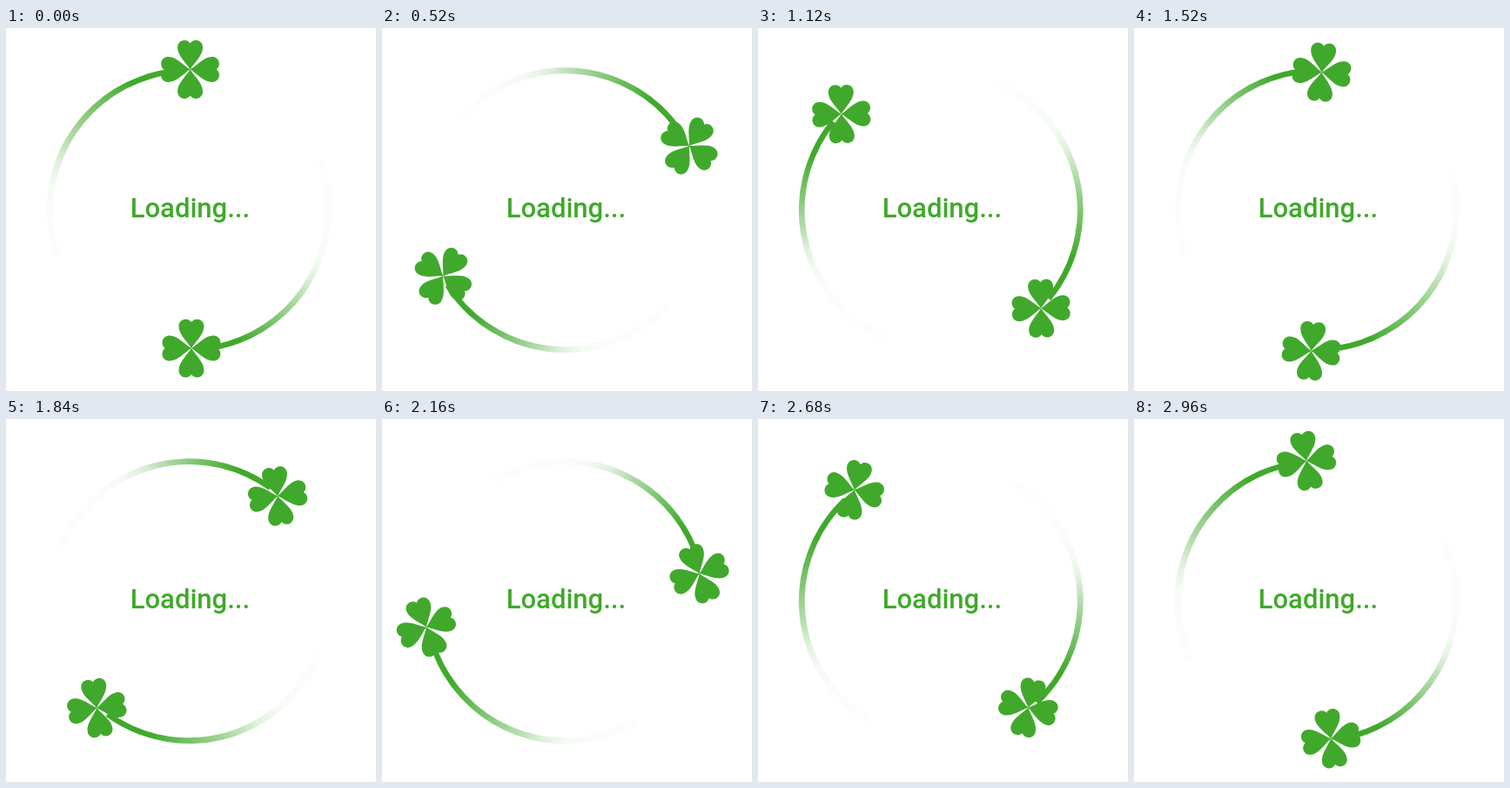
Animation, 425 px wide and 416 px high, one loop 3000 ms. Source, as an HTML page with a canvas:

```html
<!DOCTYPE html>
<html lang="en">
<head>
<meta charset="utf-8">
<title>Loading</title>
<style>
  html, body { margin: 0; width: 100%; height: 100%; overflow: hidden; background: #fff; }
  canvas { display: block; }
  p {
    position: absolute; left: 142.7px; top: 191.6px; margin: 0;
    font: 500 31px/30px Roboto, "Noto Sans", sans-serif;
    color: #40a92b; white-space: nowrap;
  }
</style>
</head>
<body>
<canvas id="stage" width="425" height="416"></canvas>
<p>Loading...</p>
<script>
const ctx = document.getElementById("stage").getContext("2d");
const RAD = Math.PI / 180;
const STEP = 40, STEPS = 75;
const CENTER = [210.2, 208.7], RADIUS = 159.8;
const LAG = 0.25 * RAD; // clovers sit slightly behind the trail's head
const TAIL = 110 * RAD, HEAD = 5 * RAD;
const leaf = new Path2D(
  "M0 0C-5-8-14.5-16-14.5-25C-14.5-34-4-36 0-30C4-36 14.5-34 14.5-25C14.5-16 5-8 0 0Z");

// Trail opacity by degrees behind the clover
const fade = [[110, .015], [95, .02], [80, .05], [70, .16], [60, .38], [45, .65], [24, 1], [0, 1]];

function makeTrail(length) {
  const gradient = ctx.createConicGradient(-Math.PI, 0, 0);
  for (const [deg, alpha] of fade)
    gradient.addColorStop((180 - deg * length) / 360, `rgba(64,169,43,${alpha})`);
  return gradient;
}

const clovers = [
  { side: 1, trail: makeTrail(1) },
  { side: -1, trail: makeTrail(0.87) },
];

// The trail lies between two shifted circles, so it thins towards its head
function drawTrail(angle, trail) {
  ctx.save();
  ctx.translate(...CENTER);
  ctx.rotate(angle);
  ctx.fillStyle = trail;
  ctx.beginPath();
  ctx.arc(-0.6, 0, RADIUS + 4, -TAIL, -HEAD);
  ctx.arc(0.6, 0, RADIUS - 3.6, -HEAD, -TAIL, true);
  ctx.fill();
  ctx.restore();
}

function drawClover(x, y, spin) {
  ctx.save();
  ctx.translate(x, y);
  ctx.rotate(spin);
  ctx.translate(0.75, 0.1);
  ctx.fillStyle = "#40a92b";
  for (let i = 0; i < 4; i++) {
    ctx.fill(leaf);
    ctx.rotate(Math.PI / 2);
  }
  ctx.restore();
}

function draw(now) {
  const turn = Math.floor(now / STEP) % STEPS / STEPS * 2 * Math.PI;
  const cos = Math.cos(turn - LAG), sin = Math.sin(turn - LAG);
  // The pair of clovers turns slightly off centre
  const x = CENTER[0] + 1.3 * cos + 1.5 * sin;
  const y = CENTER[1] + 1.3 * sin - 1.5 * cos;
  ctx.clearRect(0, 0, 425, 416);
  for (const { side, trail } of clovers) {
    drawTrail(turn - side * Math.PI / 2, trail);
    drawClover(x + side * RADIUS * sin, y - side * RADIUS * cos, 2 * turn);
  }
}

const start = performance.now();
function tick() {
  draw(performance.now() - start);
  requestAnimationFrame(tick);
}
tick();
</script>
</body>
</html>
```
